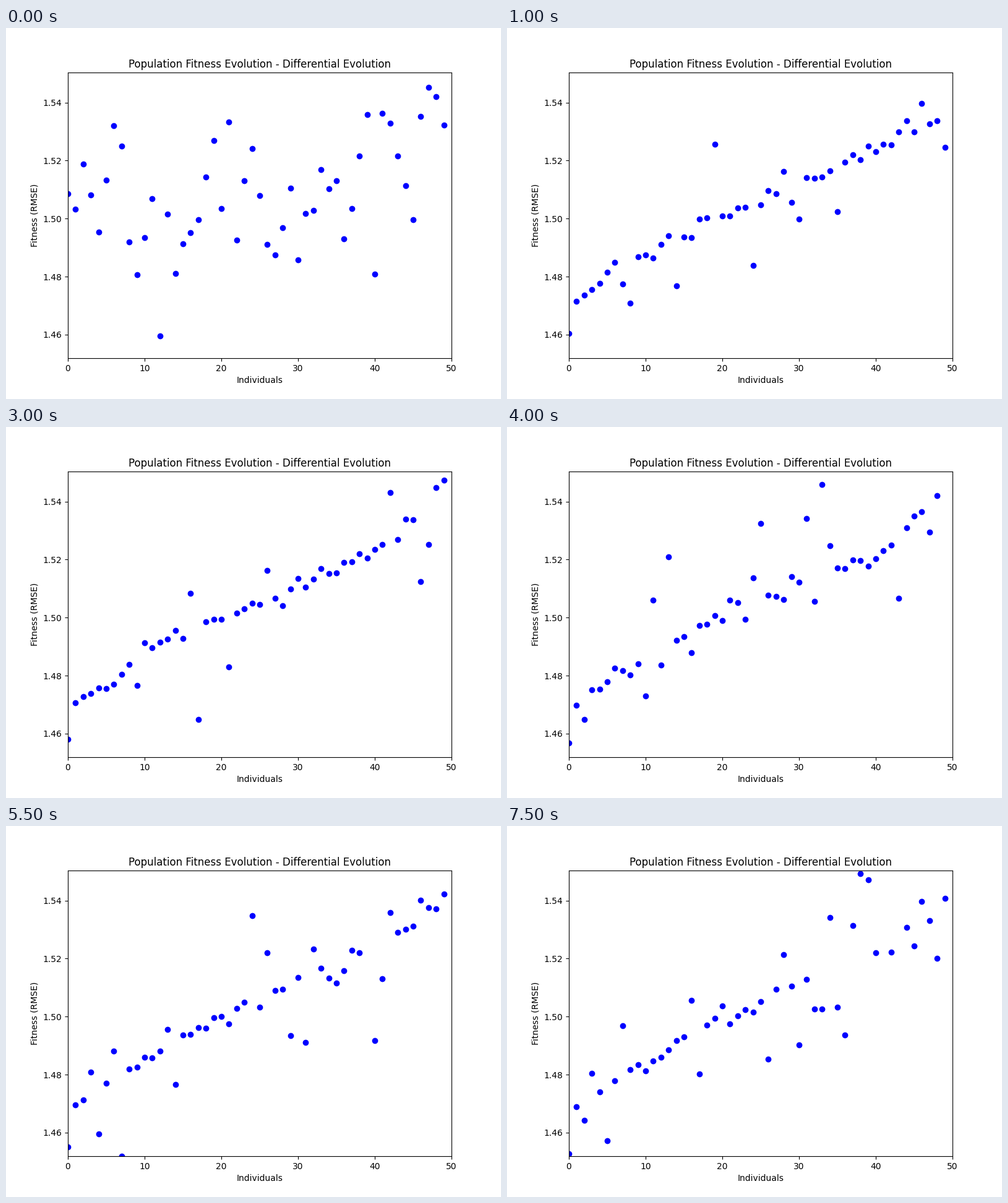
These frames come from a looping animation (800 px wide and 600 px high, 8 s). A matplotlib script:

```python
import numpy as np
import matplotlib.pyplot as plt
from matplotlib.animation import FuncAnimation

SIZE, STEPS, INTERVAL = 50, 16, 500
LOW, HIGH = 1.45187, 1.55037

# Fitness of the ranked population at a few ranks, early and late in the run.
RANKS = [0, 1, 14, 28, 42, 49]
EARLY = np.array([1.4615, 1.4715, 1.4958, 1.5090, 1.5273, 1.5530])
LATE = np.array([1.4527, 1.4687, 1.4900, 1.5097, 1.5227, 1.5400])

ids = np.arange(SIZE)


def generation(step):
    rng = np.random.default_rng(step)
    if step == 0:
        return rng.normal(1.506, 0.02, SIZE)
    mix = step / (STEPS - 1)
    ranked = np.interp(ids, RANKS, EARLY + (LATE - EARLY) * mix)
    # Most trials stay close to their rank, some land far away.
    is_trial = rng.random(SIZE) < rng.uniform(0.25, 0.5)
    spread = np.where(is_trial, 0.017, 0.0015) * np.minimum(ids / 6, 1)
    return np.maximum(ranked + rng.normal(0, spread), LOW)


fig, ax = plt.subplots(figsize=(8, 6), dpi=100)
ax.set_xlim(0, SIZE)
ax.set_ylim(LOW, HIGH)
ax.set_title("Population Fitness Evolution - Differential Evolution")
ax.set_xlabel("Individuals")
ax.set_ylabel("Fitness (RMSE)")
dots, = ax.plot([], [], "bo")


def update(step):
    dots.set_data(ids, generation(step))
    return dots,


anim = FuncAnimation(fig, update, frames=STEPS, interval=INTERVAL,
                     repeat=True, repeat_delay=0)
plt.show()
```
